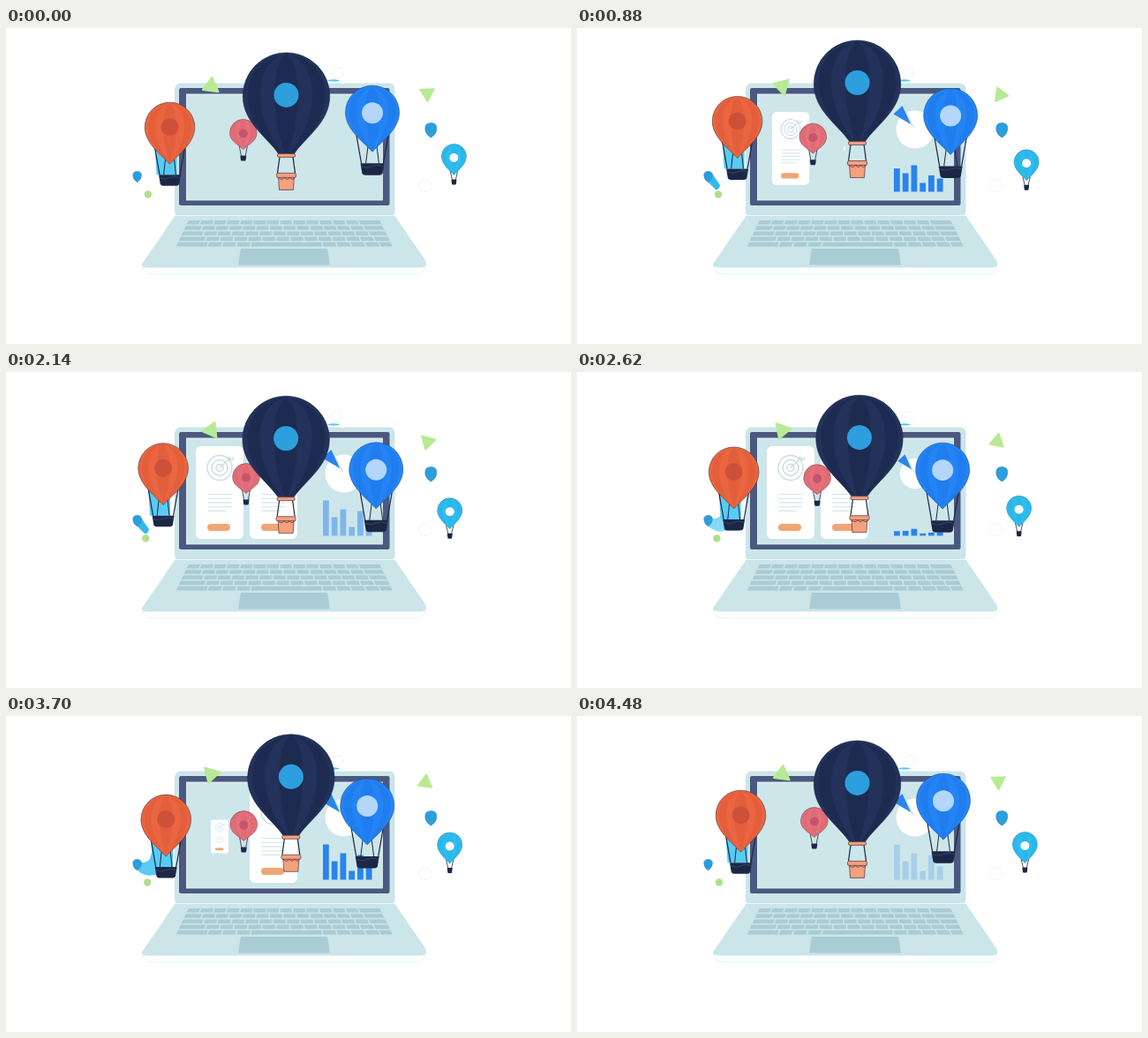
Animation, 640 px wide and 358 px high, one loop 4.54 s. Source, as an HTML page:

```html
<!DOCTYPE html>
<html lang="en">
<head>
<meta charset="utf-8">
<title>Balloons over a laptop</title>
<style>
html, body { margin: 0; width: 100%; height: 100%; overflow: hidden; background: #fff; }
svg { display: block; width: 100vw; height: 100vh; }
</style>
</head>
<body>
<svg viewBox="0 0 640 358">
  <g id="laptop">
    <rect x="191" y="62.5" width="249.5" height="152" rx="7" fill="#cbe5e9"/>
    <rect x="196" y="68" width="238.5" height="133" rx="2" fill="#4b587f"/>
    <rect x="204.5" y="75" width="222" height="120" fill="#cde6ea" stroke="#eef9fa" stroke-width=".8"/>
    <path d="M154 268Q155 279 168 279H462Q475 279 476 268Z" fill="#fff" stroke="#d5f3f5" stroke-width=".8"/>
    <path d="M192 212H440L475.5 264Q478 271.5 468 271.5H162Q152 271.5 155 266Z" fill="#cbe5e9"/>
    <path d="M191 212.5H441" stroke="#eefafa" stroke-width="1.2"/>
    <path id="keys" fill="#a9ccd4"/>
    <path d="M266 250H364L367 268.5H263Z" fill="#a9ccd4"/>
  </g>
  <g id="pie">
    <circle cx="383" cy="115" r="21.5" fill="#fff"/>
    <path d="M383 115L361 91L369 86Z" fill="#cde6ea"/>
    <path d="M358.5 97.5L368.5 88L378 109Z" fill="#2a84ee"/>
  </g>
  <g id="bars" fill="#2a84ee"></g>
  <g id="cards"></g>
  <g id="bits">
    <path id="trail" d="M145 164Q152 161 155 168L162 178Q161 184 157 183L146 172Z" fill="#35b9ea"/>
    <path id="splash" d="M168 148L186 158L183 180H166Q160 182 153 178L145 172Q145 165 152 166Q163 167 164 158Z" fill="#57cbf4"/>
  </g>
  <g id="balloons"></g>
</svg>
<script>
const LOOP = 4540, CYCLE = LOOP / 2, DRIFT = 4480;
const $ = id => document.getElementById(id);
const ramp = (t, from, length) => Math.max(0, Math.min(1, (t - from) / length));
const ease = v => v * v * (3 - 2 * v);

function add(parent, tag, attrs = {}) {
  const el = document.createElementNS("http://www.w3.org/2000/svg", tag);
  for (const k in attrs) el.setAttribute(k, attrs[k]);
  return parent.appendChild(el);
}

// Slow drift: a mean plus cosine, sine and double-speed cosine
const wave = (mean, c = 0, s = 0, c2 = 0) => a =>
  mean + c * Math.cos(a) + s * Math.sin(a) + c2 * Math.cos(2 * a);
const spin = start => a => a * 180 / Math.PI + wave(start, 16, -23)(a);

const movers = [];
const float = (el, x, y, turn = wave(0)) => movers.push({ el, x, y, turn });

// Keyboard: rows of a trapezoid split by relative key widths
function drawKeys() {
  let d = "";
  for (let row = 0; row < 5; row++) {
    const y = 218 + row * 6.2, y2 = y + 4.6;
    const sizes = Array(14).fill(1);
    sizes[0] += row * .3;
    sizes[13] = 1.7 - row * .2;
    if (row === 4) sizes.splice(4, 5, 5);
    const sum = sizes.reduce((a, b) => a + b);
    const point = (f, y) => {
      const drop = y - 218, left = 206 - drop * .48;
      return (left + (218 + drop * .98) * f).toFixed(1) + " " + y;
    };
    let used = 0;
    for (const w of sizes) {
      const a = used / sum + .0032, b = (used += w) / sum - .0032;
      d += `M${point(a, y)}L${point(b, y)}L${point(b, y2)}L${point(a, y2)}Z`;
    }
  }
  $("keys").setAttribute("d", d);
}
drawKeys();

// Every fourth bar grows at half speed
const bars = [40, 21, 30, 10, 28, 15].map((height, i) => ({
  height,
  grow: i % 4 ? 500 : 1000,
  el: add($("bars"), "rect", { x: 359 + i * 9.75, width: 6.8 })
}));

function makeCard(x, start, end) {
  const g = add($("cards"), "g");
  add(g, "rect", { x: -27, y: -52.5, width: 54, height: 105, rx: 6, fill: "#fff" });
  const icon = add(g, "g", { fill: "none", stroke: "#c8dde3", "stroke-width": 1.4 });
  for (const r of [14, 9, 4]) add(icon, "circle", { cy: -28, r });
  add(icon, "path", { d: "M0 -28L13 -40M10 -41V-37H14L16 -40" });
  for (let i = 0; i < 5; i++)
    add(g, "rect", { x: -13.5, y: 1.5 + i * 4.7, width: i < 4 ? 27 : 21, height: 1.2, fill: "#d3e6ea" });
  add(g, "rect", { x: -14, y: 35.5, width: 26, height: 8, rx: 4, fill: "#f0a674" });
  return { g, x, start, end };
}
const cards = [makeCard(242, 600, 3540), makeCard(303, 830, 3760)];

// Loose pieces
const bit = (tag, attrs, ...path) => float(add($("bits"), tag, attrs), ...path);
const leaf = r => ({
  d: `M${r} 0L${-r / 2} ${r * .85}V${-r * .85}Z`,
  fill: "#b8ea95", stroke: "#b8ea95", "stroke-width": 2, "stroke-linejoin": "round"
});
const pin = r => ({
  d: `M${-r} ${-r * .3}Q${-r} ${-r * 1.25} 0 ${-r * 1.25}T${r} ${-r * .3}Q${r} ${r * .7} 0 ${r * 1.3}Q${-r} ${r * .7} ${-r} ${-r * .3}Z`,
  fill: "#2a9fdc", stroke: "#2b86c0", "stroke-width": .6
});
const ring = r => ({ r, fill: "#fff", stroke: "#e9f0f0", "stroke-width": .7 });
bit("path", leaf(10.3), wave(232.3), wave(66), spin(21));
bit("path", leaf(9), wave(477.2, 0, 2.4), wave(76.5, -2.5), spin(72));
bit("path", pin(6.5), wave(481.3), wave(115.7));
bit("path", pin(4.8), wave(148.6), wave(168.5));
bit("circle", { r: 4.2, fill: "#aee08a" }, wave(159.6, 1.3), wave(188.5));
bit("circle", ring(7), wave(474.5), wave(178.7));
bit("circle", ring(6), wave(375, 1.5), wave(50.5));
bit("ellipse", { rx: 7, ry: 1.2, fill: "#57cbf4" }, wave(371), wave(59.5));

// Balloons: local origin is the top centre of the envelope
function balloon({ r, h, neck = 0, basket, colors, badge, back, x, y }) {
  const g = add($("balloons"), "g");
  const [width, top, bottom] = basket, [fill, stripe, edge] = colors;
  const half = width / 2, big = r > 20, dark = "#1c2745";
  const path = (d, attrs) => add(g, "path", { d, fill: "none", ...attrs });
  if (back) path(`M-17 50H8V${top}H-15Z`, { fill: back });

  const ropeX = neck ? neck - 2 : r * (big ? .6 : .3);
  const ropeY = neck ? h : h * (big ? .73 : .88);
  for (const s of [-1, 1]) {
    path(`M${s * ropeX} ${ropeY}L${s * (half - 1)} ${top}`, { stroke: dark, "stroke-width": big ? 1.2 : .8 });
    if (big && !neck) path(`M${s * 5} ${h - 6}L${s * half * .55} ${top}`, { stroke: dark });
  }

  const k = neck ? neck + r * .24 : r * .36;
  path(`M${-r} ${r}A${r} ${r} 0 0 1 ${r} ${r}C${r} ${r * 1.62} ${k} ${h * .84} ${neck} ${h}`
    + `H${-neck}C${-k} ${h * .84} ${-r} ${r * 1.62} ${-r} ${r}Z`, { fill, stroke: edge, "stroke-width": .6 });
  for (const f of [.86, .58, .26]) {
    const sx = r * f * 1.22, n = neck * f;
    path(`M0 1C${sx} ${h * .08} ${sx * 1.2} ${h * .56} ${n} ${h - 1}H${-n}C${-sx * 1.2} ${h * .56} ${-sx} ${h * .08} 0 1Z`,
      { fill: f === .58 ? fill : stripe });
  }
  const [by, br, color] = badge;
  add(g, "circle", { cy: by, r: br, fill: color });

  if (neck) {
    const cloth = { fill: "#f6a07d", stroke: "#493344", "stroke-width": .7 };
    add(g, "rect", { x: -neck - 1, y: h, width: neck * 2 + 2, height: 4, rx: 1.5, ...cloth });
    path(`M${2 - half} ${top + 4}H${half - 2}L${half - 3} ${bottom}H${3 - half}Z`, cloth);
    add(g, "rect", { x: -half, y: top, width, height: 5, rx: 1.5, ...cloth });
    path(`M${2 - half} ${top + 5}q4 4 7 0q3 4 6 0q3 4 6 0`, { ...cloth, fill: "none" });
  } else {
    path(`M${-half} ${top}H${half}L${half * .86} ${bottom - 2}Q${half * .8} ${bottom} ${half * .6} ${bottom}`
      + `H${-half * .6}Q${-half * .8} ${bottom} ${-half * .86} ${bottom - 2}Z`, { fill: dark });
    if (big) path(`M${1 - half} ${top + 3.5}q${half / 2} 3 ${half - 1} 0t${half - 1} 0`, { stroke: "#46517a", "stroke-width": .7 });
  }
  float(g, x, y);
}

balloon({
  r: 15.3, h: 34, basket: [7, 41, 47], colors: ["#e4717b", "#df6b76", "#7d4450"], badge: [16, 5, "#c6546a"],
  x: wave(269.6, -1.7, -1.1, .9), y: wave(106.1, 0, 0, -2.6)
});
balloon({
  r: 28.3, h: 70, basket: [25, 82, 94.5], colors: ["#ea6540", "#e35f3b", "#50352f"], badge: [28, 10, "#cd5138"],
  back: "#57cbf4", x: wave(180.65, 3.75, .6, 1.1), y: wave(82.9, 1.3, -6.3)
});
balloon({
  r: 30.5, h: 75, basket: [27, 88, 101.5], colors: ["#2484f5", "#1f7dee", "#1c4f95"], badge: [31, 12, "#b4d6fa"],
  x: wave(416.6, -1.6, 7.5), y: wave(72.7, -7.5, -1.9)
});
balloon({
  r: 14, h: 35, basket: [6, 40, 46], colors: ["#2fbdef", "#2ab7ea", "#2789b5"], badge: [15.5, 5, "#fff"],
  x: wave(504.8, 2.6, 3.7), y: wave(137, -5.5, 2.8)
});
balloon({
  r: 49.2, h: 114.5, neck: 9, basket: [22, 136.5, 155.5], colors: ["#22325a", "#1e2b50", "#1a2748"], badge: [48, 14, "#2d9fdd"],
  x: wave(319.15, 0, -3.1, -1.65), y: wave(21.7, 0, -3, 6.2)
});

function draw(t) {
  const a = t / DRIFT * 2 * Math.PI;
  for (const { el, x, y, turn } of movers)
    el.setAttribute("transform", `translate(${x(a)} ${y(a)}) rotate(${turn(a)})`);
  $("trail").setAttribute("opacity", ramp(t, 450, 300) - ramp(t, 2250, 350));
  $("splash").setAttribute("opacity", ramp(t, 2300, 450) - ramp(t, 3900, 350));

  const p = t % CYCLE;
  $("pie").setAttribute("transform", `translate(383 115) scale(${ease(ramp(p, 100, 350))}) translate(-383 -115)`);
  $("bars").setAttribute("opacity", 1 - ramp(p, 2000, 270));
  for (const { el, height, grow } of bars) {
    const h = height * ramp(p, 220, grow);
    el.setAttribute("y", 185.5 - h);
    el.setAttribute("height", h);
  }
  for (const { g, x, start, end } of cards) {
    const size = ease(ramp(t, start, 400)) - ease(ramp(t, end, 270));
    g.setAttribute("transform", `translate(${x} 136.5) scale(${size})`);
  }
}

// The first pose holds for 100 ms, the rest for 60 ms each
const begin = performance.now();
function tick() {
  const t = (performance.now() - begin) % LOOP;
  draw(t < 100 ? 0 : 100 + Math.floor((t - 100) / 60) * 60);
  requestAnimationFrame(tick);
}
tick();
</script>
</body>
</html>
```
